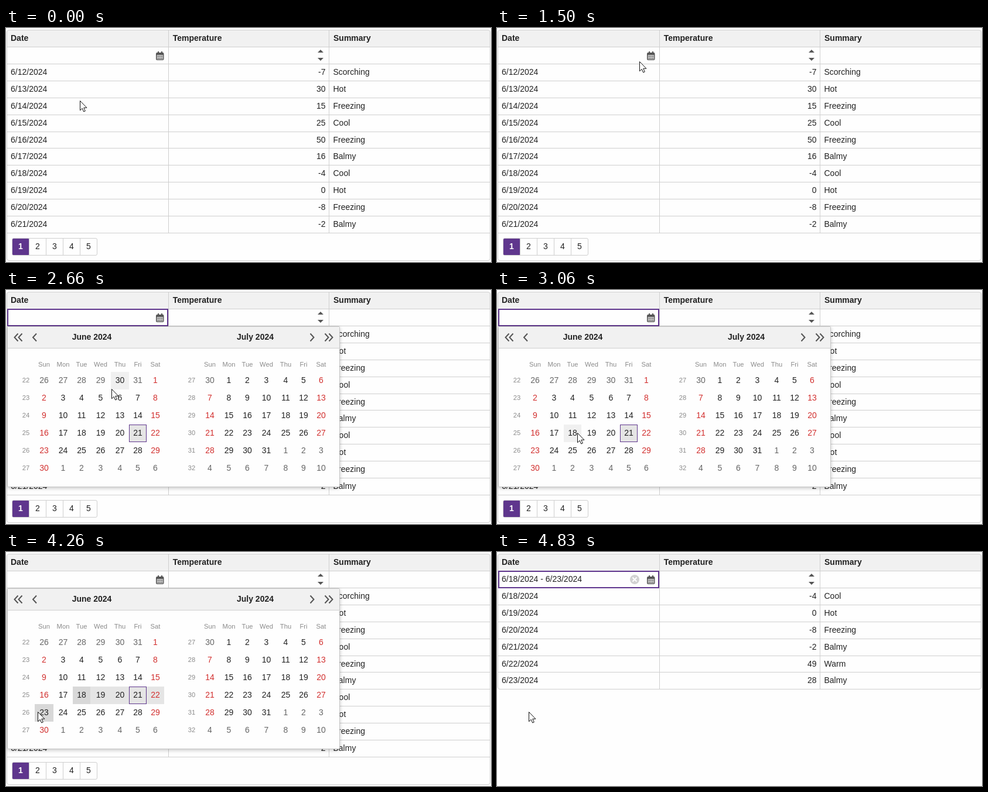
An HTML page that plays this animation: 828x400 px, repeating every 7000 ms.

```html
<!DOCTYPE html>
<html lang="en">
<head>
<meta charset="utf-8">
<title>Date range filter</title>
<style>
html, body { margin: 0; width: 100%; height: 100%; overflow: hidden; background: #fefefe; }
svg { display: block; font: 14px "Liberation Sans", Arial, sans-serif; fill: #222; white-space: pre; }
.bold { font-weight: bold; }
.line { fill: none; stroke: #cfcfcf; }
.bar { fill: #f1f1f1; }
.paper { fill: #fefefe; }
.mid { text-anchor: middle; }
.end { text-anchor: end; }
.small { font-size: 11.2px; fill: #8a8a8a; }
.dim { fill: #666; }
.red { fill: #d2302f; }
.icon { fill: #555; }
.chevron { fill: none; stroke: #555; stroke-width: 2; }
.accent { fill: #5f368d; }
.focus { fill: none; stroke: #5f368d; stroke-width: 2; }
#popup { filter: drop-shadow(0 2px 3px rgba(0, 0, 0, .22)); }
</style>
</head>
<body>
<svg id="stage" width="828" height="400" viewBox="0 0 828 400"></svg>
<script>
const LOOP = 7000;
const EDGES = [49, 81, 114, 144, 179, 210, 240, 270];
const TOP = 139.5, ROW = 30;
const TODAY = 26, START = 23;

// Moments of the hard changes, in ms
const FOCUS = 1860, OPEN = 1930, PRESS = 3530, PICK = 3660, CLOSE = 4800, FILTER = 4830;

// Pointer: step (1/30 s), x, y
const PATH = [
  [0, 126, 124], [29, 126, 124], [45, 243, 57], [51, 259, 49], [68, 259, 49],
  [80, 180, 169], [92, 137, 244], [117, 137, 244], [128, 54, 273], [210, 54, 273]
];

const ALL = [
  ["12", -7, "Scorching"], ["13", 30, "Hot"], ["14", 15, "Freezing"], ["15", 25, "Cool"],
  ["16", 50, "Freezing"], ["17", 16, "Balmy"], ["18", -4, "Cool"], ["19", 0, "Hot"],
  ["20", -8, "Freezing"], ["21", -2, "Balmy"]
];
const FILTERED = ALL.slice(6).concat([["22", 49, "Warm"], ["23", 28, "Balmy"]]);

const text = (x, y, s, cls = "", id = "") =>
  `<text x="${x}" y="${y}" class="${cls}"${id && ` id="${id}"`}>${s}</text>`;
const rect = (x, y, w, h, cls, extra = "") =>
  `<rect x="${x}" y="${y}" width="${w}" height="${h}" class="${cls}" ${extra}/>`;
const path = (d, cls) => `<path d="${d}" class="${cls}"/>`;
const group = (id, s) => `<g id="${id}">${s}</g>`;
const lineY = i => Math.floor(32.7 + 28.87 * i);

function table(rows, bottom) {
  const last = lineY(rows.length + 1);
  let s = rect(2, 4, 824, 28, "bar");
  let d = `M277.5 4V${last}M551.5 4V${last}`;
  for (let i = 0; i <= rows.length + 1; i++) {
    const y = lineY(i) + 0.5;
    if (y < bottom) d += `M2 ${y}H826`;
  }
  s += path(d, "line") + rect(1.5, 3.5, 825, bottom - 3.5, "line", 'rx="3.5"');
  ["Date", "Temperature", "Summary"].forEach((t, i) => s += text([8, 284.7, 559][i], 22, t, "bold"));
  rows.forEach(([day, temp, sum], i) => {
    const y = lineY(i + 1) + 19;
    s += text(8, y, `6/${day}/2024`) + text(545.5, y, temp, "end") + text(558.5, y, sum);
  });
  return s;
}

function pager() {
  let s = rect(10.5, 359.5, 145, 29, "line", 'rx="2.5"') + rect(11, 360, 28.5, 28, "accent", 'rx="1.5"');
  s += path("M39.5 360v28M68.5 360v28M97.5 360v28M126.5 360v28", "line");
  for (let i = 0; i < 5; i++)
    s += text(25 + 29 * i, 378, i + 1, i ? "mid" : "mid bold paper");
  return s;
}

function month(dx, title, titleX, week, shift, length, before) {
  const centre = c => (EDGES[c] + EDGES[c + 1]) / 2 + dx;
  let s = text(titleX, 85, title, "mid bold");
  ["Sun", "Mon", "Tue", "Wed", "Thu", "Fri", "Sat"].forEach((d, c) =>
    s += text(centre(c), 131, d, "mid small"));
  for (let i = 0; i < 42; i++) {
    const c = i % 7, y = 159 + ROW * Math.floor(i / 7), n = i - shift;
    if (!c) s += text(34 + dx, y - 1, week + i / 7, "mid small");
    const outside = n < 1 || n > length;
    const day = n < 1 ? n + before : n > length ? n - length : n;
    const cls = outside ? "dim" : c % 6 ? "" : "red";
    s += text(centre(c), y, day, "mid " + cls, dx ? "" : "day" + i);
  }
  return s;
}

function cell(i, fill) {
  const c = i % 7, y = TOP + ROW * Math.floor(i / 7);
  return rect(EDGES[c], y, EDGES[c + 1] - EDGES[c], ROW, "", `fill="${fill}" shape-rendering="crispEdges"`);
}

const calendarIcon =
  '<path id="icon" class="icon" fill-rule="evenodd" d="M258 42h1v-2h2v2h4v-2h2v2h.5q2 0 2 2v9q0 2-2 2h-9.500q-2 0-2-2v-9q0-2 2-2z' +
  'M257.700 46.300v7.200h10.300v-7.200z"/>' +
  path("M258.600 47.200h2.200v2.200h-2.200zm3.200 0h2.200v2.200h-2.200zm3.200 0h2.200v2.200h-2.200z" +
       "m-6.400 3.300h2.200v2.200h-2.200zm3.200 0h2.200v2.200h-2.200zm3.200 0h2.200v2.200h-2.200z", "icon dots");

const stage = document.getElementById("stage");
stage.innerHTML =
  rect(0, 0, 828, 400, "paper") +
  group("full", table(ALL, 397.5) + pager()) +
  group("short", table(FILTERED, 234.5)) +
  path("M532 42h10l-5-5zM532 51h10l-5 5z", "icon") +
  group("value", text(8, 51, "6/18/2024 - 6/23/2024") +
    '<circle cx="235" cy="47" r="8" fill="#d2d2d2"/>' +
    '<path d="M231.500 43.500l7 7m0-7l-7 7" stroke="#fff" stroke-width="2"/>') +
  calendarIcon +
  group("ring", rect(3, 33, 273, 28, "focus")) +
  group("popup",
    rect(2.5, 62.5, 567, 274, "paper", 'stroke="#c8c8c8" rx="1.5"') +
    rect(3, 63, 566, 36, "bar") + path("M3 99.500H569", "line") +
    path("M20.500 74.500l-6 6.500 6 6.500m7-13l-6 6.500 6 6.500M52 74.500l-6 6.500 6 6.500" +
         "M519.500 74.500l6 6.500-6 6.500m25-13l6 6.500-6 6.500m7-13l6 6.500-6 6.500", "chevron") +
    group("cells", "") +
    month(0, "June 2024", 146.5, 22, 5, 30, 31) +
    month(283, "July 2024", 425.5, 27, 0, 31, 30) +
    rect(210.5, 230.5, 29, 29, "", 'fill="none" stroke="#5f368d"')) +
  '<path id="pointer" d="M.5.500v16.300l3.700-3.500 2.500 5.700 2.600-1.100-2.500-5.600h5.100z" fill="#fff" stroke="#111"/>';

const $ = id => document.getElementById(id);
const show = (id, on) => $(id).style.display = on ? "" : "none";

// Monotone cubic through the pointer path
function track(n, axis) {
  let k = 0;
  while (k < PATH.length - 2 && PATH[k + 1][0] <= n) k++;
  const slope = i => i < 0 || i > PATH.length - 2 ? 0 :
    (PATH[i + 1][axis] - PATH[i][axis]) / (PATH[i + 1][0] - PATH[i][0]);
  const tangent = i => {
    const a = slope(i - 1), b = slope(i);
    return a * b > 0 ? 2 * a * b / (a + b) : 0;
  };
  const h = PATH[k + 1][0] - PATH[k][0], u = (n - PATH[k][0]) / h, v = 1 - u;
  return PATH[k][axis] * v * v * (1 + 2 * u) + PATH[k + 1][axis] * u * u * (3 - 2 * u) +
    h * u * v * (tangent(k) * v - tangent(k + 1) * u);
}

function cellAt(x, y) {
  const row = Math.floor((y - TOP) / ROW);
  const col = EDGES.findIndex((e, c) => x >= e && x < EDGES[c + 1]);
  return row < 0 || row > 5 || col < 0 ? -1 : row * 7 + col;
}

function paintCells(t, over) {
  let s = "";
  if (t < PICK) {
    s += cell(TODAY, "#e5e5e5");
    if (over >= 0 && over !== TODAY) s += cell(over, t < PRESS ? "#f0f0f0" : "#d8d8d8");
  } else {
    const tip = over < 0 ? START : over;
    const from = Math.min(START, tip), to = Math.max(START, tip);
    for (let i = from; i <= to; i++) s += cell(i, i === from || i === to ? "#d8d8d8" : "#e5e5e5");
  }
  $("cells").innerHTML = s;
  for (let i = 0; i < 42; i++) $("day" + i).style.fill = i === over ? "#222" : "";
}

function draw(t) {
  const n = Math.floor((t + 7) * 0.03);
  const x = Math.round(track(n, 1)), y = Math.round(track(n, 2));
  const open = t >= OPEN && t < CLOSE;
  $("pointer").setAttribute("transform", `translate(${x} ${y})`);
  const onIcon = x >= 256 && x < 271 && y > 39 && y < 57;
  stage.querySelectorAll("#icon, .dots").forEach(e => e.style.fill = onIcon ? "#222" : "");
  show("full", t < FILTER);
  show("short", t >= FILTER);
  show("value", t >= CLOSE);
  show("ring", t >= FOCUS && t < PRESS || t >= CLOSE);
  show("popup", open);
  if (open) paintCells(t, cellAt(x, y));
}

const begin = performance.now();
function tick() {
  draw((performance.now() - begin) % LOOP);
  requestAnimationFrame(tick);
}
tick();
</script>
</body>
</html>
```
